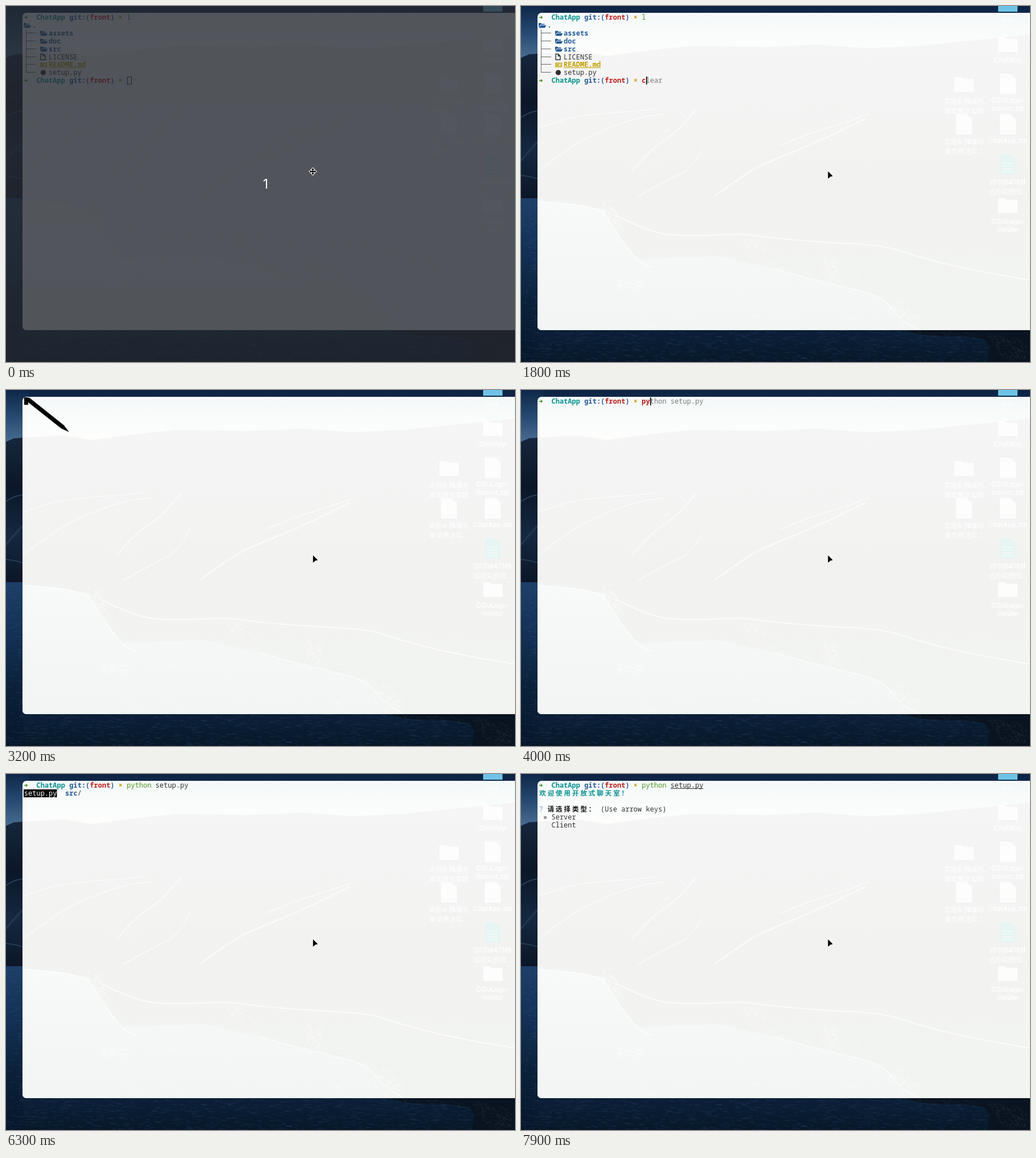
Write an HTML page with a canvas that moves like this. It is 895 px wide and 626 px high and loops after 8 s.

```html
<!DOCTYPE html>
<html lang="zh">
<head>
<meta charset="utf-8">
<title>Terminal chat room</title>
<style>
html, body { margin: 0; width: 100%; height: 100%; overflow: hidden; background: #0a1a2c; }
canvas { display: block; width: 895px; height: 626px; }
</style>
</head>
<body>
<canvas id="stage" width="895" height="626"></canvas>
<script>
const W = 895, H = 626, LOOP = 8000, STEP = 100;
const CELL = 7.22, ROW = 13.9, LEFT = 31.8;
const MONO = '"Noto Sans Mono", "DejaVu Sans Mono", monospace';
const SANS = 'Inter, "Noto Sans CJK SC", "Noto Sans CJK", sans-serif';
const CJK = '"Noto Sans CJK SC", "Noto Sans CJK", sans-serif';
const INK = '#303030', TEAL = '#06928f', BLUE = '#245a9c', RED = '#c41a16',
      GREEN = '#4e9a22', GOLD = '#c4a000', GREY = '#777b79';

const stage = document.getElementById('stage').getContext('2d');
const backdrop = document.createElement('canvas');
backdrop.width = W;
backdrop.height = H;
let g = backdrop.getContext('2d');

let seed = 7;
const rand = () => (seed = (seed * 16807) % 2147483647) / 2147483647;
const colX = c => LEFT + c * CELL;
const rowY = r => 20 + r * ROW;

function box(x, y, w, h, color) {
  g.fillStyle = color;
  g.fillRect(x, y, w, h);
}

function shape(points, color) {
  g.beginPath();
  points.forEach(([x, y]) => g.lineTo(x, y));
  g.closePath();
  g.fillStyle = color;
  g.fill();
}

function curve(points, color, width) {
  g.beginPath();
  g.moveTo(...points[0]);
  for (let i = 1; i < points.length - 1; i++) {
    const [x, y] = points[i], [u, v] = points[i + 1];
    g.quadraticCurveTo(x, y, (x + u) / 2, (y + v) / 2);
  }
  g.lineTo(...points[points.length - 1]);
  g.strokeStyle = color;
  g.lineWidth = width;
  g.stroke();
}

function fade(y0, y1, ...colors) {
  const f = g.createLinearGradient(0, y0, 0, y1);
  colors.forEach((c, i) => f.addColorStop(i / (colors.length - 1), c));
  return f;
}

// ---- desktop and window ----

function ripples(n, x, y, w, h, color) {
  g.strokeStyle = color;
  g.lineWidth = 1;
  g.beginPath();
  for (let i = 0; i < n; i++) {
    const px = x + rand() * w, py = y + rand() * h, len = 3 + rand() * 9;
    g.moveTo(px, py);
    g.lineTo(px + len, py + rand() * 2 - 0.5);
  }
  g.stroke();
}

// short bright scratches scattered along a line of rock
function crags(n, x0, y0, x1, y1, spread, color) {
  g.strokeStyle = color;
  g.lineWidth = 1;
  g.beginPath();
  for (let i = 0; i < n; i++) {
    const k = rand();
    const x = x0 + (x1 - x0) * k + (rand() - 0.5) * spread;
    const y = y0 + (y1 - y0) * k + (rand() - 0.5) * spread;
    g.moveTo(x, y);
    g.lineTo(x + rand() * 10 - 3, y + rand() * 9 - 3);
  }
  g.stroke();
}

function drawDesktop() {
  box(0, 0, W, 13, fade(0, 13, '#0c2243', '#12294a'));
  box(0, 0, 40, 100, fade(0, 90, '#0e2748', '#254870', '#476b90'));
  shape([[0, 91], [14, 85], [40, 83], [40, 340], [0, 340]], fade(85, 340, '#16263b', '#0b1728', '#142840', '#0b1626'));
  curve([[0, 196], [12, 188], [30, 184]], '#263d58', 2);
  curve([[0, 272], [14, 255], [30, 238]], '#22384f', 3);
  curve([[0, 298], [12, 299], [30, 304]], '#3b5671', 1);
  box(0, 338, 40, 288, fade(338, 626, '#1d3f68', '#132f54', '#0a2038', '#07172a'));
  box(29, 565, W, 61, fade(565, 626, '#0b2038', '#07182a'));
  ripples(130, 0, 345, 34, 230, 'rgba(70,105,145,.18)');
  ripples(900, 0, 570, W, 56, 'rgba(60,95,130,.2)');
  shape([[672, 569], [700, 577], [740, 581], [775, 580], [815, 586], [824, 600], [820, 626], [W, 626], [W, 569]], '#0a1420');
  crags(120, 830, 590, 895, 612, 36, 'rgba(90,100,105,.2)');
  crags(40, 690, 574, 820, 582, 8, 'rgba(80,95,110,.25)');
  box(839, 0, 34, 10, '#6fc3e8');
}

function folder(x, y, color = 'rgba(255,255,255,.85)') {
  shape([[x - 17, y - 13], [x - 5, y - 13], [x - 2, y - 10], [x + 17, y - 10], [x + 17, y + 13], [x - 17, y + 13]], color);
}

function page(x, y, color = 'rgba(255,255,255,.85)') {
  shape([[x - 14, y - 18], [x + 5, y - 18], [x + 14, y - 9], [x + 14, y + 18], [x - 14, y + 18]], color);
}

function caption(x, y, ...lines) {
  g.font = '500 11.5px ' + SANS;
  g.textAlign = 'center';
  g.textBaseline = 'middle';
  g.fillStyle = '#fff';
  lines.forEach((s, i) => g.fillText(s, x, y + i * (/[^\x00-\x7f]/.test(s) ? 16.5 : 14)));
}

function drawIcons() {
  caption(856, 26, 'prjs');
  folder(856, 68);
  caption(856, 96, 'ChatApp');
  folder(779, 138);
  caption(779, 169, '实验4-降维与', '聚类算法实践');
  page(856, 137);
  caption(856, 167, 'CQULogo-', 'master.zip');
  page(779, 208);
  caption(779, 240, '实验4-降维与', '聚类算法实…');
  page(856, 208);
  caption(856, 238, 'ChatApp.zip');
  page(856, 279, '#e6f5f3');
  for (let i = 0; i < 4; i++) box(846, 276 + i * 5, 19, 1, '#f8fefd');
  caption(856, 311, '20318475林', '远舟实验四…');
  folder(856, 351);
  caption(856, 380, 'CQULogo-', 'master');
}

function drawWindow() {
  g.save();
  g.beginPath();
  g.roundRect(29, 12, 900, 558, 7);
  g.clip();
  box(29, 12, W, 90, fade(12, 90, '#f4f8f8', '#f9fcfb', '#fdfefc'));
  shape([[29, 84], [100, 80], [150, 88], [235, 77], [300, 70], [430, 72], [520, 68], [610, 74], [700, 70],
    [780, 62], [895, 50], [895, 570], [29, 570]], fade(60, 560, '#f4f5f4', '#f2f3f1', '#f2f4f2'));
  shape([[29, 343], [90, 348], [145, 358], [165, 395], [205, 445], [350, 440], [440, 461], [540, 488],
    [635, 510], [665, 550], [700, 570], [29, 570]], fade(343, 570, '#f7faf9', '#f5f7f6', '#f2f5f3'));
  const pale = 'rgba(255,255,255,.6)';
  curve([[30, 215], [80, 196], [150, 188], [215, 184], [240, 180]], pale, 1.5);
  curve([[30, 290], [90, 245], [140, 220], [205, 196], [250, 190]], pale, 1.5);
  curve([[195, 290], [230, 250], [270, 225], [310, 180]], pale, 2);
  curve([[340, 335], [400, 290], [450, 268], [520, 240], [605, 198]], pale, 2.5);
  curve([[455, 246], [500, 226], [560, 208], [612, 190]], pale, 1.5);
  curve([[205, 335], [260, 305], [300, 285], [325, 240]], pale, 1.5);
  curve([[170, 370], [230, 400], [300, 405], [390, 400], [440, 408], [540, 416], [640, 421], [700, 442], [790, 464], [895, 482]], 'rgba(255,255,255,.85)', 1.5);
  curve([[29, 343], [90, 348], [145, 358], [165, 395], [205, 450], [230, 460]], pale, 2);
  curve([[440, 461], [540, 488], [635, 510], [665, 550], [700, 570]], pale, 1.5);
  crags(70, 150, 345, 170, 395, 22, pale);
  crags(60, 390, 402, 440, 455, 24, pale);
  crags(60, 545, 445, 535, 480, 28, pale);
  crags(70, 645, 515, 690, 562, 30, pale);
  crags(70, 460, 245, 605, 195, 30, 'rgba(255,255,255,.45)');
  crags(60, 190, 300, 330, 190, 45, 'rgba(255,255,255,.3)');
  ripples(350, 200, 460, 420, 108, 'rgba(255,255,255,.25)');
  ripples(25, 165, 480, 40, 20, pale);
  drawIcons();
  g.restore();
}

// ---- terminal ----

function put(s, col, row, color = INK, weight = 400) {
  g.font = weight + ' 12px ' + MONO;
  g.textAlign = 'left';
  g.textBaseline = 'alphabetic';
  g.fillStyle = color;
  [...s].forEach((ch, i) => g.fillText(ch, colX(col + i), rowY(row) + 4));
}

function putWide(s, col, row, color) {
  g.font = '700 11.5px ' + CJK;
  g.textAlign = 'left';
  g.textBaseline = 'alphabetic';
  g.fillStyle = color;
  [...s].forEach((ch, i) => g.fillText(ch, colX(col + 2 * i) + 0.4, rowY(row) + 4));
}

function underline(col, n, row, color = INK) {
  box(colX(col), Math.round(rowY(row) + 5), n * CELL, 1, color);
}

function prompt(row) {
  const y = rowY(row);
  box(32, y - 0.8, 4, 1.6, GREEN);
  shape([[35, y - 3], [38.5, y], [35, y + 3]], GREEN);
  put('ChatApp', 3, row, TEAL, 600);
  put('git:(', 11, row, BLUE, 600);
  put('front', 16, row, RED, 600);
  put(')', 21, row, BLUE, 600);
  put('×', 23, row, GOLD, 600);
}

function command(text, hint, row) {
  const name = text.split(' ')[0];
  const known = name === 'clear' || name === 'python';
  put(name, 25, row, known ? GREEN : RED, known ? 400 : 600);
  put(text.slice(name.length), 25 + name.length, row);
  put(hint, 25 + text.length, row, GREY);
}

function treeFolder(x, y) {
  shape([[x, y - 4], [x + 4, y - 4], [x + 5.5, y - 2.5], [x + 10.5, y - 2.5], [x + 10.5, y - 0.8], [x + 3, y - 0.8], [x, y + 4]], BLUE);
  shape([[x + 3.4, y + 0.2], [x + 13.5, y + 0.2], [x + 10.8, y + 4.6], [x + 0.6, y + 4.6]], BLUE);
}

function tree() {
  treeFolder(31, rowY(1));
  put('.', 2, 1, BLUE, 600);
  box(35, 41, 1, 76, '#666');
  for (let r = 2; r < 8; r++) box(35, Math.round(rowY(r) - 1), 18, 1, '#666');
  ['assets', 'doc', 'src'].forEach((s, i) => {
    treeFolder(60, rowY(i + 2));
    put(s, 6, i + 2, BLUE, 600);
  });
  let y = rowY(5);
  g.strokeStyle = INK;
  g.lineWidth = 1.4;
  g.stroke(new Path2D(`M61 ${y - 5}h4.5l3.5 3.5v6.5h-8zM65.5 ${y - 5}v3.5h3.5`));
  put('LICENSE', 6, 5);
  y = rowY(6);
  g.strokeStyle = GOLD;
  g.strokeRect(61, y - 3, 10.5, 6.5);
  g.stroke(new Path2D(`M63 ${y + 2}v-3l1.5 1.5l1.5 -1.5v3M69 ${y - 1}v3`));
  put('README.md', 6, 6, GOLD, 600);
  underline(6, 9, 6, GOLD);
  g.beginPath();
  g.arc(65.5, rowY(7) - 0.2, 4.6, 0, 7);
  g.fillStyle = INK;
  g.fill();
  put('setup.py', 6, 7);
}

function bar(col, row) {
  box(Math.round(colX(col) + 0.4), Math.round(rowY(row) - 7), 1.6, 14, '#000');
}

// streak left behind by a jumping cursor, pointed at its far end
function trail(hx, hy, tx, ty, thick) {
  const d = Math.hypot(tx - hx, ty - hy);
  if (d < 4) return;
  const ux = (tx - hx) / d, uy = (ty - hy) / d, n = thick / 2, tip = Math.min(15, d / 2);
  const bx = tx - ux * tip, by = ty - uy * tip;
  shape([[hx - uy * n, hy + ux * n], [bx - uy * n, by + ux * n], [tx, ty], [bx + uy * n, by - ux * n], [hx + uy * n, hy - ux * n]], '#000');
}

// tail eases from a to b after the given start
function jump(t, start, a, b, thick = 8) {
  if (t < start || t > start + 400) return;
  const k = 1 - Math.pow(0.45, (t - start) / STEP + 0.5);
  trail(b[0], b[1], a[0] + (b[0] - a[0]) * k, a[1] + (b[1] - a[1]) * k, thick);
}

const typing = [
  [500, '', ''], [1800, 'c', 'lear'], [1900, 'cl', 'ear'], [2000, 'cle', 'ar'], [2100, 'clera', ''],
  [2400, '', ''], [2600, 'c', 'lear'], [2700, 'cl', 'ear'], [2800, 'cle', 'ar'], [2900, 'clea', 'r'], [3000, 'clear', ''],
  [3300, '', ''], [3800, 'p', ''], [4000, 'py', 'thon setup.py'], [4200, 'pyt', 'hon setup.py'],
  [4300, 'pytho', 'n setup.py'], [4400, 'python', ' setup.py'], [4500, 'python ', 'setup.py'],
  [4700, 'python s', 'etup.py'], [5700, 'python setup.py', ''], [6600, 'python setup.py ', '']
];
const blinks = [[1100, 1500], [5500, 5700], [6300, 6600], [7100, 7300]];

function firstScreen(t, text, hint) {
  prompt(0);
  put('l', 25, 0, GREEN);
  tree();
  prompt(8);
  if (t < 500) {
    g.strokeStyle = '#222';
    g.lineWidth = 1;
    g.strokeRect(213.5, 124.5, 7, 13);
  }
  if (t < 2300) return command(text, hint, 8);
  command('clera', '', 8);
  put('zsh: command not found: clera', 0, 9);
  if (t < 2400) return trail(32, rowY(10), 130, rowY(9), 8);
  prompt(10);
  command(text, hint, 10);
  jump(t, 2400, [60, rowY(10)], [213, rowY(10)]);
}

function secondScreen(t, text, hint) {
  if (t < 3300) {
    box(32, 13, 7, 13, '#000');
    return trail(38, 16, 111, 74, 7.5);
  }
  prompt(0);
  command(text, hint, 0);
  jump(t, 3300, [40, 24], [213, 20]);
  jump(t, 5700, [271, 20], [322, 20]);
  if (t >= 4700 && t < 5100) underline(32, 1, 0);
  if (t >= 5100 && t < 6600) {
    const picked = t >= 5700;
    if (picked) box(31, 27, 58.5, 14, '#000');
    put('setup.py', 0, 1, picked ? '#fff' : INK);
    put('src', 10, 1, BLUE, 600);
    put('/', 13, 1);
  }
  if (t >= 6600) underline(32, 8, 0);
  if (t >= 7300 && t < 7800) {
    box(32, 27, 7, 14, '#000');
    jump(t, 7300, [329, 20], [36, 34]);
  }
  if (t >= 7800) putWide('欢迎使用开放式聊天室！', 0, 1, TEAL);
  if (t >= 7900) {
    put('?', 0, 3, '#7f95cc');
    putWide('请选择类型：', 2, 3, '#111');
    put('(Use arrow keys)', 15, 3);
    put('»', 1, 4);
    put('Server', 3, 4);
    put('Client', 3, 5);
  }
}

function terminal(t) {
  const [, text, hint] = typing.filter(k => k[0] <= t).pop() || [0, '', ''];
  (t < 3200 ? firstScreen : secondScreen)(t, text, hint);
  const busy = t < 500 || (t >= 2300 && t < 2400) || (t >= 3200 && t < 3300) || t >= 7300;
  const dark = blinks.some(([a, b]) => t >= a && t < b);
  if (!busy && !dark) bar(25 + text.length, t < 2300 ? 8 : t < 3200 ? 10 : 0);
}

// ---- pointer and countdown ----

function pointer(t) {
  g.save();
  g.lineJoin = 'round';
  g.strokeStyle = '#fff';
  g.fillStyle = '#000';
  if (t < 500) {
    g.translate(539.5, 291);
    const move = new Path2D();
    for (let i = 0; i < 4; i++) {
      const arm = new Path2D('M-.9 0V-3H-2.6L0 -6L2.6 -3H.9V0Z');
      move.addPath(arm, new DOMMatrix().rotate(i * 90));
    }
    g.lineWidth = 2;
    g.stroke(move);
    g.fill(move);
  } else {
    g.translate(t < 700 ? 538 : 539.8, t < 700 ? 285.5 : 290.8);
    const arrow = new Path2D('M0 0L8.6 8.4L4.4 9.2L0 13Z');
    g.lineWidth = 1.2;
    g.stroke(arrow);
    g.fill(arrow);
  }
  g.restore();
}

function countdown() {
  box(0, 0, W, H, 'rgba(36,40,48,.78)');
  g.font = '400 23px ' + SANS;
  g.textAlign = 'center';
  g.textBaseline = 'alphabetic';
  g.fillStyle = '#fff';
  g.fillText('1', 456.5, 321);
}

drawDesktop();
drawWindow();
g = stage;

function frame(now) {
  const t = Math.floor((now % LOOP) / STEP) * STEP;
  g.drawImage(backdrop, 0, 0);
  terminal(t);
  if (t < 100) countdown();
  pointer(t);
  requestAnimationFrame(frame);
}
requestAnimationFrame(frame);
</script>
</body>
</html>
```
